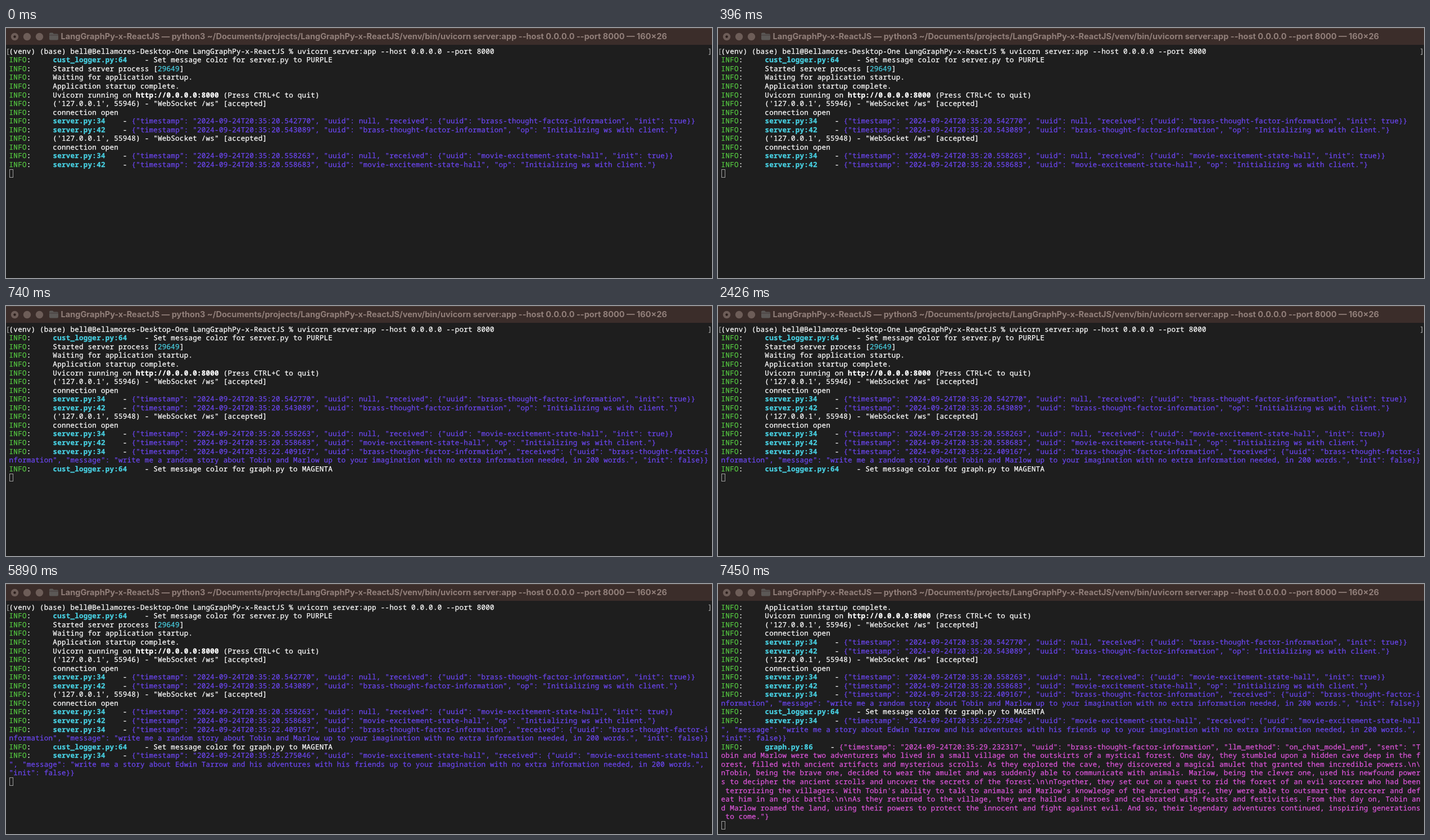
Recreate the animation shown at these times as an HTML page. Size 1256 px wide and 446 px high, loop 8000 ms.

```html
<!DOCTYPE html>
<html lang="en">
<head>
<meta charset="utf-8">
<title>Server log</title>
<style>
  :root { --row: 15.56px; }
  html, body { margin: 0; width: 100%; height: 100%; overflow: hidden; background: #1e1e1e; }
  .bar {
    position: absolute; inset: 0 0 auto; height: 30px; box-sizing: border-box;
    background: #3b2d2a; border-top: 1px solid #4d413d;
  }
  .bar svg { position: absolute; left: 0; top: -1px; }
  .bar text { font: 700 14.56px Inter, "Open Sans", sans-serif; fill: #917f7a; white-space: pre; }
  .screen { position: absolute; inset: 33.7px 0 0; overflow: hidden; }
  .log {
    padding-left: 5.6px; overflow: hidden; position: relative;
    font: 500 12.6px/var(--row) "Noto Sans Mono", "DejaVu Sans Mono", monospace;
    letter-spacing: .22px; font-variant-ligatures: none; text-rendering: geometricPrecision;
    -webkit-text-stroke: .25px; white-space: pre; color: #fff;
    animation: print 8s step-end infinite;
  }
  .cursor {
    width: 7.5px; height: 14.5px; margin: .5px 0 0 5.8px; box-sizing: border-box;
    border: 1px solid #a0a0a0;
  }
  .info { color: #54c440; }
  .file { color: #48d0e2; font-weight: 700; }
  .num { color: #48d0e2; }
  .purple { color: #6b46f0; }
  .magenta { color: #dc55da; }
  .mark { position: absolute; top: 0; left: -.5px; color: #999; }
  .mark.end { left: 1248.5px; }
  /* Rows printed so far; the last batch also scrolls four rows away. */
  @keyframes print {
    0% { height: calc(14 * var(--row)); }
    8.25% { height: calc(16 * var(--row)); }
    9.25% { height: calc(17 * var(--row)); }
    44.375% { height: calc(20 * var(--row)); margin-top: 0; }
    93.125%, 100% { height: calc(29 * var(--row)); margin-top: calc(-4 * var(--row)); }
  }
</style>
</head>
<body>
<div class="bar">
  <svg width="1256" height="30">
    <g fill="#6d5d58">
      <circle cx="15.5" cy="15.5" r="6.7"/>
      <circle cx="37.5" cy="15.5" r="6.7"/>
      <circle cx="59.5" cy="15.5" r="6.7"/>
    </g>
    <circle cx="15.5" cy="15.5" r="2.2" fill="#2c1f1c"/>
    <path d="M77 10.5q0-2 2-2h4l2 2h6q2 0 2 2v7q0 2-2 2H79q-2 0-2-2z" fill="#5b5856"/>
    <path d="M77 12.8H93" stroke="#43393a"/>
    <text x="97.5" y="20.3">LangGraphPy-x-ReactJS — python3 ~/Documents/projects/LangGraphPy-x-ReactJS/venv/bin/uvicorn server:app --host 0.0.0.0 --port 8000 — 160×26</text>
  </svg>
</div>
<div class="screen">
  <div class="log"></div>
  <div class="cursor"></div>
</div>
<script>
const COLS = 160;
const BRASS = 'brass-thought-factor-information';
const MOVIE = 'movie-excitement-state-hall';

const span = (cls, text) => `<span class="${cls}">${text}</span>`;
const info = text => span('info', 'INFO') + ':     ' + text;

// Breaks text at the terminal's width, the first row starting at column `used`.
function wrap(text, used) {
  const rows = [text.slice(0, COLS - used)];
  for (let i = COLS - used; i < text.length; i += COLS) rows.push(text.slice(i, i + COLS));
  return rows.join('\n');
}

function entry(file, text, color) {
  const used = 16 + file.length;
  return info(span('file', file) + '    - ' + span(color, wrap(text, used)));
}

const stamp = (time, uuid) => `{"timestamp": "2024-09-24T20:35:${time}", "uuid": ${uuid}, `;
const received = (time, from, uuid, rest) =>
  entry('server.py:34', stamp(time, from) + `"received": {"uuid": "${uuid}", ${rest}}}`, 'purple');
const opened = (time, uuid) =>
  entry('server.py:42', stamp(time, `"${uuid}"`) + '"op": "Initializing ws with client."}', 'purple');
const asked = (time, uuid, topic) =>
  received(time, `"${uuid}"`, uuid, `"message": "write me a ${topic} up to your imagination with no extra information needed, in 200 words.", "init": false`);
const connect = (port, firstTime, nextTime, uuid) => [
  info(`('127.0.0.1', ${port}) - "WebSocket /ws" [accepted]`),
  info('connection open'),
  received(firstTime, 'null', uuid, '"init": true'),
  opened(nextTime, uuid),
];
const colorSet = (file, color) =>
  entry('cust_logger.py:64', `Set message color for ${file} to ${color}`, 'plain');

const story = String.raw`Tobin and Marlow were two adventurers who lived in a small village on the outskirts of a mystical forest. One day, they stumbled upon a hidden cave deep in the forest, filled with ancient artifacts and mysterious scrolls. As they explored the cave, they discovered a magical amulet that granted them incredible powers.\n\nTobin, being the brave one, decided to wear the amulet and was suddenly able to communicate with animals. Marlow, being the clever one, used his newfound powers to decipher the ancient scrolls and uncover the secrets of the forest.\n\nTogether, they set out on a quest to rid the forest of an evil sorcerer who had been terrorizing the villagers. With Tobin's ability to talk to animals and Marlow's knowledge of the ancient magic, they were able to outsmart the sorcerer and defeat him in an epic battle.\n\nAs they returned to the village, they were hailed as heroes and celebrated with feasts and festivities. From that day on, Tobin and Marlow roamed the land, using their powers to protect the innocent and fight against evil. And so, their legendary adventures continued, inspiring generations to come.`;

document.querySelector('.log').innerHTML = [
  span('mark', '[') + span('mark end', ']') +
    '(venv) (base) bell@Bellamores-Desktop-One LangGraphPy-x-ReactJS % uvicorn server:app --host 0.0.0.0 --port 8000',
  colorSet('server.py', 'PURPLE'),
  info(`Started server process [${span('num', '29649')}]`),
  info('Waiting for application startup.'),
  info('Application startup complete.'),
  info('Uvicorn running on <b>http://0.0.0.0:8000</b> (Press CTRL+C to quit)'),
  ...connect(55946, '20.542770', '20.543089', BRASS),
  ...connect(55948, '20.558263', '20.558683', MOVIE),
  asked('22.409167', BRASS, 'random story about Tobin and Marlow'),
  colorSet('graph.py', 'MAGENTA'),
  asked('25.275046', MOVIE, 'story about Edwin Tarrow and his adventures with his friends'),
  entry('graph.py:86', stamp('29.232317', `"${BRASS}"`) +
    `"llm_method": "on_chat_model_end", "sent": "${story}"}`, 'magenta'),
].join('\n');
</script>
</body>
</html>
```
